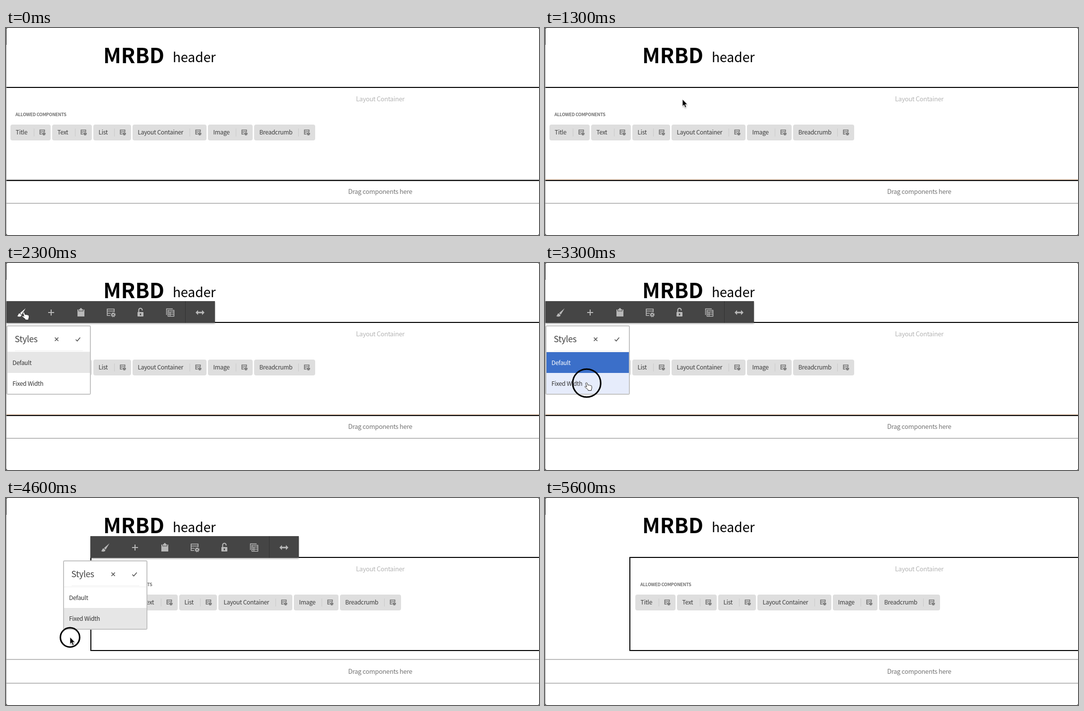
Recreate the animation shown at these times as an HTML page. Size 1074 by 418 pixels, loop 5.7 s.

```html
<!DOCTYPE html>
<html lang="en">
<head>
<meta charset="utf-8">
<title>Layout editor</title>
<style>
html, body { margin: 0; width: 100%; height: 100%; overflow: hidden; background: #fff; }
svg { display: block; font: 12px "Noto Sans CJK JP", "Noto Sans CJK SC", "Noto Sans", sans-serif; }
.ui { letter-spacing: -.025em; }
.mid { font-size: 12.8px; text-anchor: middle; }
.line { fill: none; stroke: currentColor; }
</style>
</head>
<body>
<svg width="1074" height="418" viewBox="0 0 1074 418">
  <defs>
    <g id="config">
      <path class="line" stroke-width="1.6" d="M-1 6H-7V-7H7V-1M-7-3H7M-7 1.5H0"/>
      <circle class="line" cx="5" cy="4.5" r="2.5" stroke-width="2"/>
      <circle class="line" cx="5" cy="4.5" r="4.2" stroke-width="1.6" stroke-dasharray="1.65"/>
    </g>
    <filter id="shadow" x="-10%" y="-10%" width="120%" height="140%">
      <feDropShadow dx="0" dy="1.5" stdDeviation="1.5" flood-opacity=".35"/>
    </filter>
  </defs>

  <text x="196" y="71" font-size="42" font-weight="700">MRBD</text>
  <text x="336" y="69" font-size="26.5">header</text>

  <g id="drag" class="ui">
    <path id="dragTop" d="M0 306H1074" stroke-width="2"/>
    <path d="M0 354H1074" stroke="#bcbcbc" stroke-width="2"/>
    <text class="mid" x="754" y="335" fill="#767676">Drag components here</text>
  </g>

  <g class="line" stroke-width="2">
    <path id="top" class="line"/>
    <path id="bottom" class="line"/>
    <path id="side" class="line" d="M171 119V309"/>
  </g>
  <text class="ui mid" x="754" y="148" fill="#b5b5b5">Layout Container</text>
  <g id="allowed" class="ui">
    <text x="19" y="178" font-size="9" font-weight="700" fill="#707070">ALLOWED COMPONENTS</text>
  </g>

  <path d="M.5 0V418" stroke="#a0a0a0"/>
  <path d="M.5 0V34" stroke="#222"/>
  <path d="M0 0H3L0 3ZM1074 0H1072L1074 2ZM1074 418H1072L1074 416ZM0 418H3L0 415Z" fill="#555"/>

  <g id="toolbar">
    <rect x="1" y="77" width="420" height="44" fill="#444" filter="url(#shadow)"/>
    <path d="M361.5 77V121" stroke="#333"/>
    <g fill="#b8b8b8" color="#b8b8b8">
      <path id="brush" transform="translate(31 100)" d="M8.5-8.5L-2.5 1L.8 4.2ZM-3.3 1.8C-7 2-5.2 6-8.5 7C-5 9.3 1 8.4 0 5Z"/>
      <path class="line" transform="translate(91 100)" stroke-width="2" d="M-6 0H6M0-6V6"/>
      <g transform="translate(151 100)">
        <path d="M-7-6H7V8H-7Z"/>
        <path d="M-4.5-6V-3H4.5V-6" fill="none" stroke="#444"/>
        <path d="M-3.5-4V-7H-1.5V-9H1.5V-7H3.5V-4Z"/>
      </g>
      <use href="#config" x="211" y="100"/>
      <g transform="translate(271 100)">
        <rect x="-6" y="-1" width="12" height="9" rx="1"/>
        <path class="line" stroke-width="2" d="M-3.5-1V-5A3.5 3.5 0 0 1 3.5-5V-4"/>
        <path d="M0 2V5.5" stroke="#444" stroke-width="2.4"/>
      </g>
      <path class="line" transform="translate(331 100)" stroke-width="1.5"
        d="M-4.5-4.5H7.5V7.5H-4.5ZM-4.5-1H7.5M-4.5 3.2H7.5M-.5-1V7.5M-7.5 5V-7.5H5"/>
      <path transform="translate(391 100)" d="M-9 0L-4-5V-1.5H4V-5L9 0L4 5V1.5H-4V5Z"/>
    </g>
  </g>

  <g id="popup" class="ui" fill="#333">
    <rect x="2" y="127" width="168" height="138" rx="2" fill="#fff" stroke="#c4c4c4" stroke-width="2"/>
    <path d="M18 177H155M3 179.5H169" stroke="#eee"/>
    <text x="17.5" y="160" font-size="17.3" font-weight="300" fill="#444">Styles</text>
    <path d="M98.5 150.5L105.5 157.5M105.5 150.5L98.5 157.5M140.5 154.5L143.5 157.5L149.5 150.5"
      fill="none" stroke="#555" stroke-width="1.6"/>
    <g class="row"><rect x="3" y="180" width="166" height="42"/><text x="13" y="206">Default</text></g>
    <g class="row"><rect x="3" y="222" width="166" height="42"/><text x="13" y="248">Fixed Width</text></g>
  </g>

  <circle id="ring" fill="none" stroke="#000" stroke-width="3"/>
  <g id="cursor">
    <path id="arrow" stroke="#fff" stroke-width=".8" filter="url(#shadow)"
      d="M0 0V14L3.2 11.2L5.4 16.5L7.8 15.5L5.6 10.3H9.8Z"/>
    <path id="hand" fill="#fff" stroke="#222" stroke-linejoin="round"
      d="M-2 1.2C-2-.6 .4-.9 1 .8L2.6 5C3.3 4 5 4.2 5.3 5.2C6 4.4 7.6 4.7 7.9 5.8C8.8 5.3 10 5.8 10.1 7C10.5 9 10.6 11 9.5 13L9.3 15.5H3L2.5 13.5C.5 11.5-2 10.5-3.5 8.5C-4 7-2.5 6.3-1.2 7.3L.2 8.4Z"/>
  </g>
</svg>
<script>
const LOOP = 5700, STEP = 100;
const $ = id => document.getElementById(id);
const set = (el, attrs) => { for (const k in attrs) el.setAttribute(k, attrs[k]); };
const show = (el, on) => set(el, { visibility: on ? 'visible' : 'hidden' });
const shift = (id, x, y = 0) => set($(id), { transform: `translate(${x} ${y})` });
const rows = document.querySelectorAll('.row');

// Component chips: label, left and right edge
const chips = [['Title', 9, 90], ['Text', 93, 173], ['List', 176, 252],
  ['Layout Container', 255, 404], ['Image', 407, 497], ['Breadcrumb', 500, 623]];
$('allowed').innerHTML += chips.map(([label, l, r]) => `
  <rect x="${l}" y="195" width="${r - l}" height="32" rx="4" fill="#dedede"/>
  <path d="M${r - 33.5} 203V219" stroke="#cacaca"/>
  <text x="${l + 10.5}" y="215" fill="#3c3c3c">${label}</text>
  <use href="#config" color="#555" transform="translate(${r - 17} 210.5) scale(.68)"/>`).join('');

// Pointer path: time, x, y
const path = [[300, 268, 416], [800, 274, 325], [1000, 277, 144], [1300, 277, 144],
  [1400, 261, 145], [1700, 36, 99.5], [2300, 36, 99.5], [2600, 46, 122], [3100, 84, 242],
  [3900, 84, 242], [4400, 129, 281], [4700, 129, 281], [5100, 165, 335], [5400, 195, 390]];
const clicks = [930, 1630, 3030, 4410];

function pointer(t) {
  const i = path.findIndex(p => p[0] > t);
  if (i < 1) return path[0].slice(1);
  const [t0, x0, y0] = path[i - 1], [t1, x1, y1] = path[i];
  const u = (t - t0) / (t1 - t0), k = u * u * (3 - 2 * u);
  return [x0 + (x1 - x0) * k, y0 + (y1 - y0) * k];
}

function draw(t) {
  const within = (from, to) => t >= from && t < to;
  const fixed = t >= 3500, active = within(900, 4700);

  // Page layout
  const left = fixed ? 170 : 0;
  const stroke = active ? '#ad8a4a' : '#b0b0b0';
  set($('top'), { d: `M${left} 120H1074`, stroke });
  set($('bottom'), { d: `M${left} 308H1074`, stroke: active && !fixed ? '#bb8150' : stroke });
  set($('side'), { stroke: active ? '#c58440' : stroke });
  show($('side'), fixed);
  set($('dragTop'), { stroke: fixed ? '#bcbcbc' : active ? '#e2cbb8' : '#d0d0d0' });
  shift('drag', 0, fixed ? 20 : 0);
  shift('allowed', fixed ? 173 : 0);

  // Toolbar and styles menu
  shift('toolbar', fixed ? 169 : 0);
  shift('popup', fixed ? 114 : 0);
  show($('toolbar'), within(1400, 4700));
  show($('popup'), within(2100, 4700));
  set($('brush'), { fill: within(1700, 2500) ? '#fff' : '#b8b8b8' });
  const focused = within(3200, 4500), chosen = t >= 3400 ? 1 : 0;
  rows.forEach((row, i) => {
    const on = i === chosen, hover = i === 1 && within(2900, 3400);
    set(row.firstChild, { fill: on ? (focused ? '#3b6fc9' : '#e6e6e6') : hover ? '#e6ecfb' : '#fff' });
    set(row.lastChild, { fill: on && focused ? '#fff' : '#333' });
  });

  // Pointer and click ring
  const [x, y] = pointer(t), visible = within(300, 5400);
  const hand = within(1600, 2600) || within(2900, 3500);
  shift('cursor', x, y);
  show($('arrow'), visible && !hand);
  show($('hand'), visible && hand);
  const click = clicks.find(c => within(c, c + 275));
  show($('ring'), click);
  if (click) set($('ring'), { cx: x, cy: y + .5, r: Math.max(1, (t - click) * .11 - 1.5) });
}

const start = performance.now();
function frame() {
  const t = (performance.now() - start) % LOOP;
  draw(Math.floor(t / STEP) * STEP);
  requestAnimationFrame(frame);
}
frame();
</script>
</body>
</html>
```
